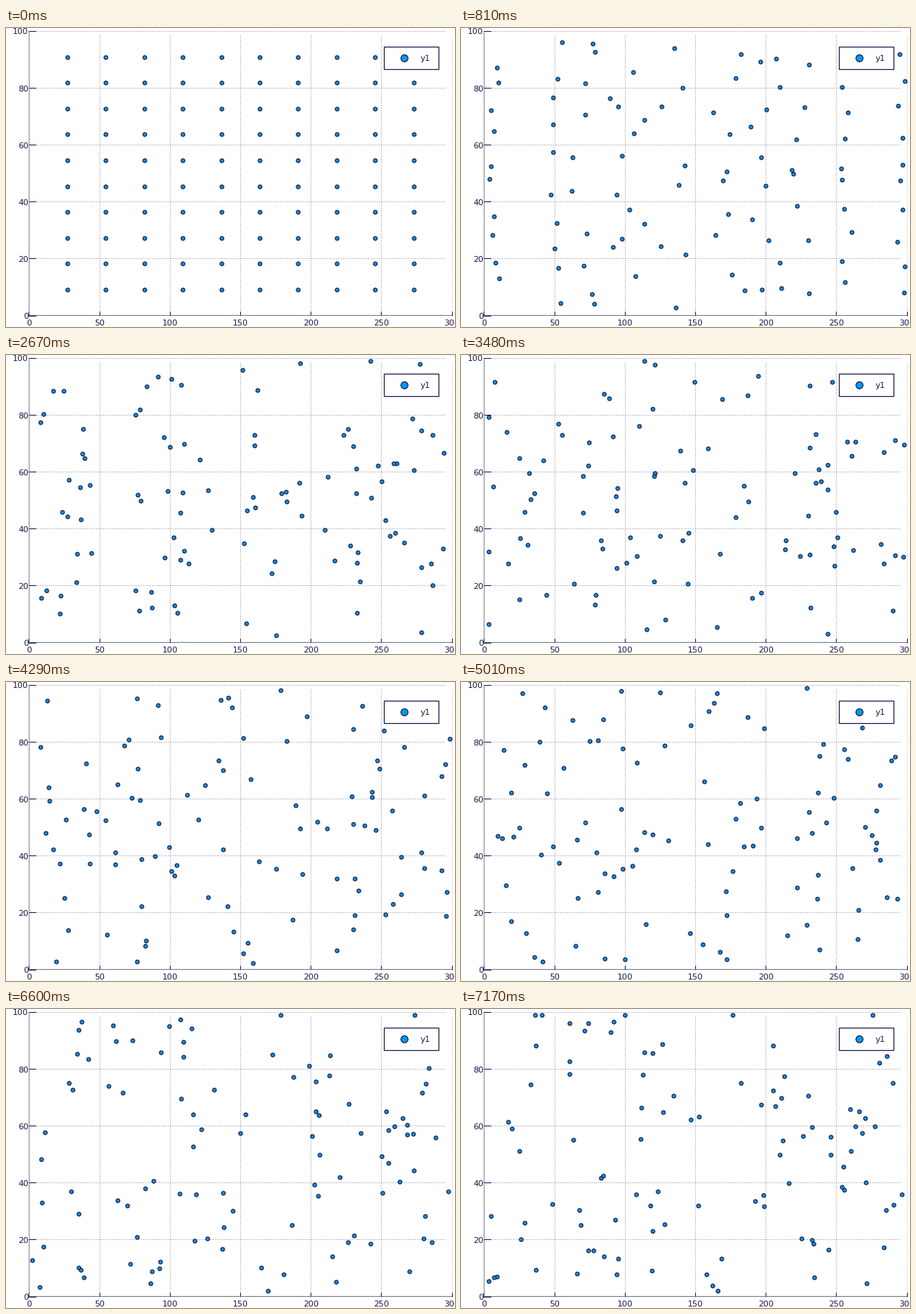
These frames come from a looping animation (600 px wide and 400 px high, 7200 ms). A matplotlib script:

```python
import numpy as np
import matplotlib.pyplot as plt
from matplotlib.animation import FuncAnimation
from matplotlib.patches import Rectangle

W, H, DPI = 600, 400, 100
FRAMES, STEP = 240, 30
BURST, STICK = 54, 212          # end of the opening burst, start of sticky walls
NAVY, AXIS, GRID, BLUE = "#1c1a4a", "#77758f", "#85859c", "#0099fa"
LO, HI = np.array([34.5, 7.5]), np.array([593.5, 377.0])
X0, Y0, DX, DY = 30.4, 384.5, 94.2, 76.1   # plot origin and tick spacing
MID = 195                                  # height of the mirror axis


def px(points):
    return points * 72 / DPI


# A 10 x 10 grid; every rule mirrors the upper half onto the lower one
rng = np.random.default_rng(5)
col, row = np.divmod(np.arange(100), 10)
a = np.abs(row - 4.5)
side = np.where(row > 4, -1, 1)
outer = (col < 3) | (col > 7)
start = np.column_stack([30.7 + 51.39 * (col + 1), Y0 - 34.6 * (row + 1)])


def mirrored_noise(sx, sy):
    noise = rng.normal(0, 1, (10, 5, 2))[col, a.astype(int)]
    return noise * np.column_stack([np.full(100, sx), sy * side])


def bend(c, x, dy):
    part = col == c
    spread[part] = np.column_stack([x + 0 * a, MID + side * dy])[part]


# Pose after the burst: a shaken core between five bent columns
spread = np.column_stack([225 + 57 * (col - 3), MID + 35.5 * side * a])
spread = spread + mirrored_noise(20, 12) + rng.normal(0, 3, (100, 2))
bend(0, 2 * LO[0] - 67, 34.5 * a)          # has bounced off the left wall
bend(1, 115 + 0.5 * a, 41.5 * a - a**2)
bend(2, 144 + 16.5 * a - 2.1 * a**2, 76 * a - 8.3 * a**2)
bend(8, 515 + 0.6 * a**2, 24.5 * a + 2 * a**2)
bend(9, 2 * HI[0] - 574.5 - 0.15 * a**2, 33.4 * a)   # off the right wall

vel = mirrored_noise(1.0, 1.5) + rng.normal(0, 0.3, (100, 2))
vel[outer] *= 0.75
vel[:, 0] += 0.5 * ((col == 9) * 1 - (col == 0))


def fold(p):
    w = HI - LO
    return LO + w - np.abs((p - LO) % (2 * w) - w)


def flight(n):
    if n >= BURST:
        return fold(spread + vel * (n - BURST))
    s = n / BURST
    ease = s * (2 - s)
    return fold(start + (spread - start) * ease + vel * BURST * (s**3 - s**2))


def place(n):
    if n <= STICK:
        return flight(n)
    last = flight(STICK)
    pos = flight(n)
    glide = last + (last - flight(STICK - 1)) * (n - STICK)
    pos[:, 1] = np.clip(glide[:, 1], LO[1], HI[1])
    return pos


fig = plt.figure(figsize=(W / DPI, H / DPI), dpi=DPI, facecolor="white")
ax = fig.add_axes([0, 0, 1, 1])
ax.set_xlim(0, W)
ax.set_ylim(H, 0)
ax.axis("off")


def line(x, y, color=NAVY, **kw):
    ax.plot(x, y, color=color, lw=px(1), solid_capstyle="butt",
            dash_capstyle="butt", **kw)


def label(x, y, text, ha="center", **kw):
    ax.text(x, y, text, ha=ha, va="center_baseline", color=NAVY,
            fontsize=px(11), family="DejaVu Sans", **kw)


dots = dict(ls=(0, (1, 2)), zorder=1)
for i in range(7):
    x = X0 + DX * i
    if i:
        line([x, x], [10, Y0], "#b4b4c2" if i == 6 else GRID, **dots)
    line([x, x], [Y0, Y0 - 6], zorder=2)
    label(x + 0.5, 393.5, str(50 * i))
for i in range(6):
    y = Y0 - DY * i
    if i:
        line([X0, 587], [y, y], GRID, **dots)
    line([X0, 39.5], [y, y], zorder=2)
    label(30, y + 0.5, str(20 * i), "right")
line([31, 31], [4, Y0], AXIS, zorder=2, snap=False)
line([31, 596], [Y0, Y0], AXIS, zorder=2, snap=False)

mark = dict(ls="", marker="o", mfc=BLUE, mec="#10103a", mew=px(1.1))
particles, = ax.plot([], [], ms=px(5.1), zorder=3, **mark)

ax.add_patch(Rectangle((505, 24.7), 73, 30, fc="white", ec=NAVY,
                       lw=px(1.2), zorder=4))
ax.plot([532.2], [40], ms=px(9.4), zorder=5, **mark)
label(560.8, 40.5, "y1", zorder=5)


def draw(n):
    particles.set_data(*place(n).T)
    return particles,


anim = FuncAnimation(fig, draw, frames=FRAMES, interval=STEP,
                     repeat=True, repeat_delay=0)
plt.show()
```
